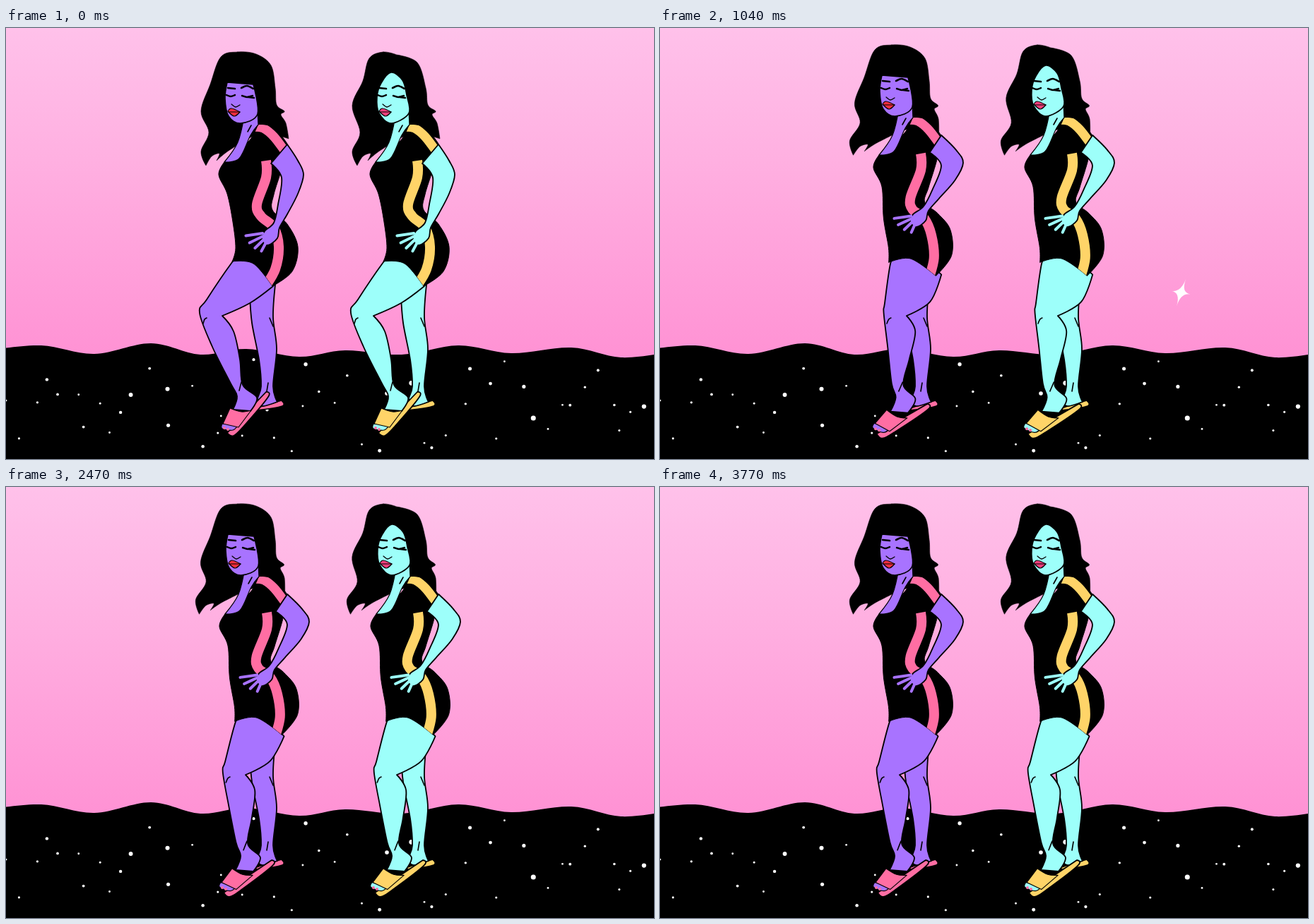
An HTML page with a canvas for the animation above (3900 ms loop, 917 by 611 pixels).

```html
<!DOCTYPE html>
<html lang="en">
<head>
<meta charset="utf-8">
<title>Dancers</title>
<style>
html, body { margin: 0; width: 100%; height: 100%; overflow: hidden; background: #000; }
canvas { display: block; }
</style>
</head>
<body>
<canvas id="stage" width="917" height="611"></canvas>
<script>
const ctx = document.getElementById('stage').getContext('2d');
const STEP = 130, STEPS = 30;
const INK = '#000', PINK = '#ff6ea3';

const clamp = v => Math.max(0, Math.min(1, v));

// Key points are "x,y"; a trailing "!" marks a sharp corner.
const parse = text => text.split(' ').map(p => {
  const [x, y] = p.split(',').map(parseFloat);
  return { x, y, sharp: p.endsWith('!') };
});
const parseAll = parts => Object.fromEntries(
  Object.entries(parts).map(([name, text]) => [name, parse(text)]));

const locks = ' 383,109 394,118 389,123 396,135 400,157! 360,150 318,172 298,188! 302,178 291,182 283,195! 276,175 287,148 ';

const body = parseAll({
  backSandal: '352,540! 366,535 390,528! 391,536 355,542!',
  backLeg: '345,378! 348,418 358,470 361,508 356,526 362,536 384,530! 378,508 383,455 378,410 381,364!',
  backKnee: '373,411 378,423',
  backAnkle: '371,503 369,515',
  sole: '368,516! 371,523 336,565 322,578 313,574! 345,540!',
  frontLeg: '330,322! 320,332 284,385 274,404 292,452 318,504 327,522 321,541! 346,543! 355,524 335,506 331,470 322,430 306,408! 345,390 378,366! 365,340!',
  knee: '284,411 281,413 279,419',
  ankle: '333,502 330,514',
  toes: '306,561! 306,568 321,570 328,563!',
  strap: '317,539! 333,544 347,542! 329,566! 307,561!',
  fringeHair: '328,34 354,37 375,53 381,85' + locks + '276,118 289,80 304,41',
  partedHair: '320,34 339,38! 368,49 380,85' + locks + '276,110 291,75 300,43',
  dress: '309,190! 301,208 313,235 321,275 325,312 320,331! 350,334 377,366! 405,345 413,310 398,278 377,258 379,236 390,200 398,164! 379,141 357,137! 344,160',
  neck: '337,125! 328,162 309,190! 330,185 346,152 357,137! 356,118!',
  collar: '347,138 342,147',
  shoulder: '350,140 364,142 379,154 395,175',
  stripe: '368,188! 368,212 355,250 361,267 379,283 386,310 381,342 366,368',
  arm: '398,165! 413,188 421,208 413,235 398,264 387,283 384,298 370,308 362,300 366,288 379,276 385,250 390,212 375,192!'
});

const face = parseAll({
  fringe: '313,77! 350,80! 356,122 332,135 315,125 310,100',
  parted: '331,63 347,74 353,95 356,121 331,135 314,121 311,98 317,78',
  lips: '314,118! 319,114 331,119! 323,125',
  mouth: '315,119 331,119'
});
const brows = ['314,85 324,86', '333,85 341,82 350,86'].map(parse);
const lids = ['312,95 318,97 324,95', '334,96 341,98 349,96', '343,98 351,99'].map(parse);
const nose = parse('319,108 325,112 331,109');
const ground = parse('-20,456 50,450 125,462 205,447 275,463 340,455 415,466 480,457 560,463 640,450 715,461 800,453 870,467 937,460');

const dancers = [
  { x: 0, skin: '#a873ff', trim: PINK, lips: '#ee2d3d', style: 'fringe' },
  { x: 214, skin: '#9dfffa', trim: '#ffd468', lips: '#ed3f7c', style: 'parted' }
];

// x, y, half width at the peak, peak step
const sparkles = [
  [103, 92, 23, 3], [737, 375, 23, 6], [683, 77, 28, 13],
  [230, 250, 29, 16], [850, 212, 18, 23], [97, 373, 22, 26]
];

// How far a point travels between the low and the high pose.
const turn = (p, x, y, angle) => [-(p.y - y) * angle, (p.x - x) * angle];
const still = () => [0, 0];
const headShift = () => [1, -10];
const hairShift = p => {
  const [dx, dy] = turn(p, 330, 100, 0.1 * clamp((p.y - 100) / 60));
  return [dx, dy - 10];
};
const torsoShift = p => {
  const hip = clamp((p.y - 245) / 70);
  const [dx, dy] = turn(p, 325, 318, -0.28);
  return [1 + (dx - 1) * hip, -10 + (dy + 10) * hip];
};
const armShift = p => [
  8 * Math.cos((p.y - 208) / 87 * Math.PI),
  -13 - 0.09 * (p.y - 165)
];
const legShift = p => {
  const reach = p.y < 408 ? 45 : 70;
  return [
    3 + 30 * Math.exp(-(((p.y - 408) / reach) ** 2)),
    -0.28 * (p.x - 325) * clamp((400 - p.y) / 40) + 2 * clamp((p.y - 500) / 40)
  ];
};
const footShift = p => {
  const [dx, dy] = turn(p, 318, 570, 0.22);
  return [dx - 4, dy + 2];
};

const move = (pts, shift, t) => pts.map(p => {
  const [dx, dy] = shift(p);
  return { x: p.x + dx * t, y: p.y + dy * t, sharp: p.sharp };
});

function trace(pts, closed) {
  const n = pts.length;
  const at = i => closed ? pts[(i + n) % n] : pts[Math.max(0, Math.min(n - 1, i))];
  const slope = i => {
    const k = at(i).sharp ? 0 : 1 / 6, a = at(i - 1), b = at(i + 1);
    return { x: (b.x - a.x) * k, y: (b.y - a.y) * k };
  };
  ctx.beginPath();
  ctx.moveTo(pts[0].x, pts[0].y);
  for (let i = 0; i < (closed ? n : n - 1); i++) {
    const a = at(i), b = at(i + 1), u = slope(i), v = slope(i + 1);
    ctx.bezierCurveTo(a.x + u.x, a.y + u.y, b.x - v.x, b.y - v.y, b.x, b.y);
  }
  if (closed) ctx.closePath();
}

function fill(pts, color, width = 1.8) {
  trace(pts, true);
  ctx.fillStyle = color;
  ctx.fill();
  ctx.lineWidth = width;
  ctx.stroke();
}

function line(pts, width = 1.6, color = INK) {
  trace(pts, false);
  ctx.lineWidth = width;
  ctx.strokeStyle = color;
  ctx.stroke();
  ctx.strokeStyle = INK;
}

function dot(x, y, r, color) {
  ctx.beginPath();
  ctx.arc(x, y, r, 0, 7);
  ctx.fillStyle = color;
  ctx.fill();
}

function drawLegs(d, t) {
  const part = (name, shift) => move(body[name], shift, t);
  fill(part('backSandal', still), d.trim);
  fill(part('backLeg', still), d.skin);
  line(body.backKnee);
  line(body.backAnkle);
  fill(part('sole', footShift), d.trim);
  fill(part('frontLeg', legShift), d.skin);
  line(part('knee', legShift));
  line(part('ankle', legShift));
  fill(part('toes', footShift), d.skin, 1.2);
  for (const i of [0, 1]) dot(309 + 5 * i - 3 * t, 567 + 2 * i + t, 2, PINK);
  fill(part('strap', footShift), d.trim, 1.2);
}

function drawDress(d, t) {
  const part = name => move(body[name], torsoShift, t);
  fill(part('dress'), INK, 1);
  ctx.save();
  ctx.clip();
  ctx.lineCap = 'butt';
  line(part('stripe'), 14, d.trim);
  line(part('shoulder'), 13, d.trim);
  ctx.restore();
  fill(part('neck'), d.skin, 1.2);
  line(part('collar'));
}

function drawArm(d, t) {
  fill(move(body.arm, armShift, t), d.skin);
  for (let i = 0; i < 4; i++) {
    const angle = 0.15 + 0.31 * i, reach = 37 - 2 * i;
    const finger = [0.35, 1].map(k => ({
      x: 376 - Math.cos(angle) * reach * k,
      y: 289 + Math.sin(angle) * reach * k
    }));
    line(move(finger, armShift, t), 4, d.skin);
  }
}

function drawHead(d, t) {
  const show = (pts, width) => line(move(pts, headShift, t), width);
  fill(move(face[d.style], headShift, t), d.skin, 1.6);
  brows.forEach(p => show(p, 2.6));
  lids.forEach(p => show(p, 2.4));
  show(nose, 1.3);
  fill(move(face.lips, headShift, t), d.lips, 1.2);
  show(face.mouth, 1.2);
}

function drawDancer(d, swing) {
  const t = Math.min(swing, 1);
  ctx.save();
  ctx.translate(d.x, 0);
  ctx.strokeStyle = INK;
  ctx.lineCap = ctx.lineJoin = 'round';
  drawLegs(d, swing);
  fill(move(body[d.style + 'Hair'], hairShift, t), INK, 0.6);
  drawDress(d, t);
  drawArm(d, t);
  drawHead(d, t);
  ctx.restore();
}

function drawGround() {
  trace(ground, false);
  ctx.lineTo(937, 620);
  ctx.lineTo(-20, 620);
  ctx.fillStyle = INK;
  ctx.fill();
  let seed = 11;
  const random = () => (seed = seed * 16807 % 2147483647) / 2147483647;
  for (let i = 0; i < 52; i++)
    dot(917 * (i + random()) / 52, 470 + 130 * random(), 1.4 + 2.2 * random() ** 3, '#fff');
}

function drawSparkle(x, y, r) {
  ctx.beginPath();
  ctx.moveTo(x + 0.55 * r, y - 1.46 * r);
  for (const [px, py] of [[1, 0.18], [-0.45, 1.46], [-1, -0.17], [0.55, -1.46]])
    ctx.quadraticCurveTo(x, y, x + px * r, y + py * r);
  ctx.fillStyle = '#fff';
  ctx.fill();
}

const sky = ctx.createLinearGradient(0, 0, 0, 465);
sky.addColorStop(0, '#ffc1ea');
sky.addColorStop(0.4, '#ffb0e1');
sky.addColorStop(1, '#ff92d4');

function render(step) {
  ctx.fillStyle = sky;
  ctx.fillRect(0, 0, 917, 611);
  drawGround();
  for (const [x, y, r, peak] of sparkles) {
    const away = Math.abs(step - peak);
    if (away < 3) drawSparkle(x, y, r * (1 - 0.21 * away));
  }
  const swing = [0, 1, 1.3, 1.3, 1][step % 5];
  dancers.forEach(d => drawDancer(d, swing));
}

const start = performance.now();
function tick() {
  render(Math.floor((performance.now() - start) / STEP) % STEPS);
  requestAnimationFrame(tick);
}
tick();
</script>
</body>
</html>
```
